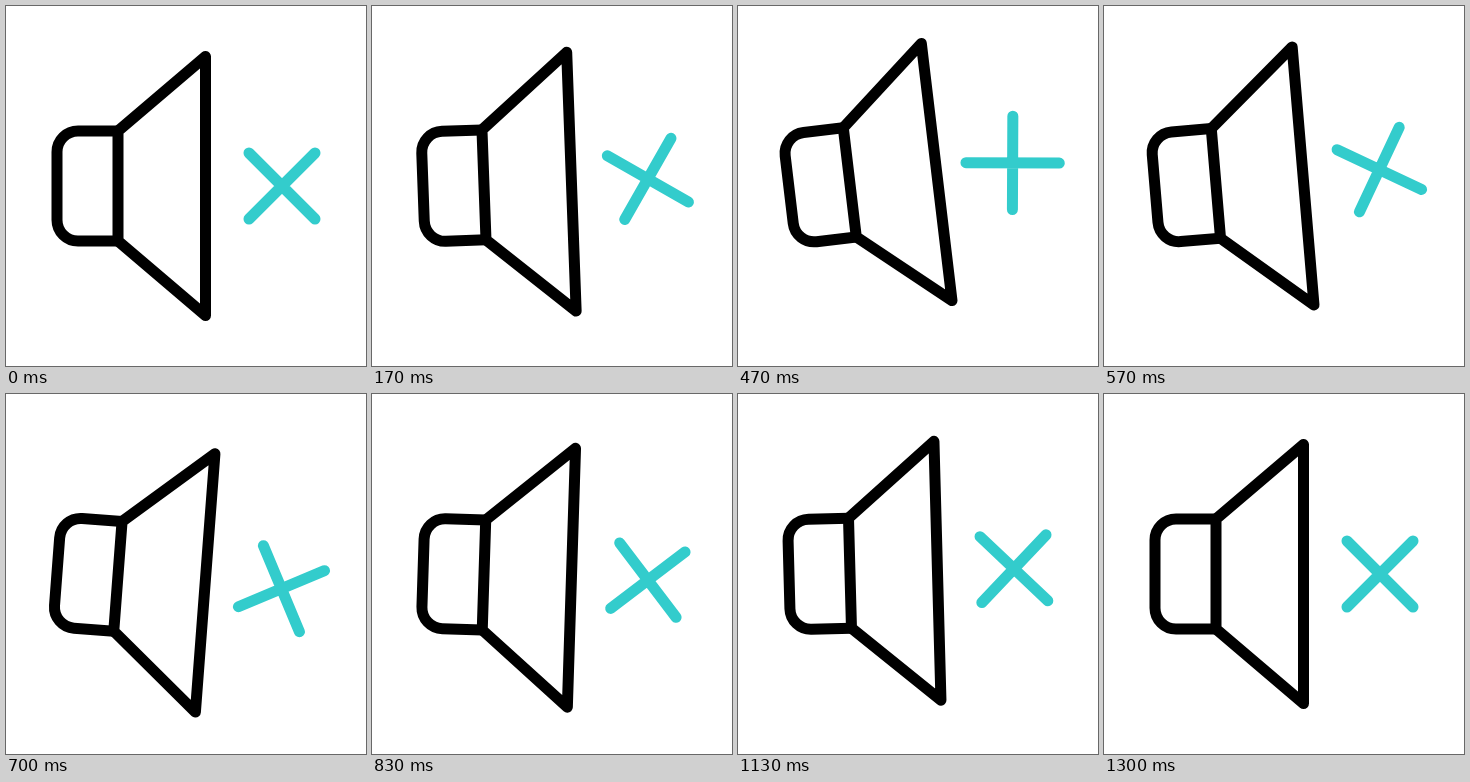
Write an HTML page that moves like this. It is 360 px wide and 360 px high and loops after 2000 ms.

```html
<!DOCTYPE html>
<html lang="en">
<head>
<meta charset="utf-8">
<title>Muted speaker</title>
<style>
  html, body { margin: 0; width: 100%; height: 100%; overflow: hidden; background: #fff; }
  svg { display: block; width: 100vw; height: 100vh; }
  path { fill: none; stroke: #000; stroke-width: 11; stroke-linecap: round; stroke-linejoin: round; }
  #cross { stroke: #3cc; }
</style>
</head>
<body>
<svg viewBox="0 0 360 360">
  <g id="icon">
    <path d="M112 125H72A21 21 0 0 0 51 146V214A21 21 0 0 0 72 235H112"/>
    <path d="M112 125L199.5 50.5V309.5L112 235Z"/>
    <path id="cross" d="M243 147L309 213M309 147L243 213"/>
  </g>
</svg>
<script>
const LOOP = 2000, FPS = 30;
const icon = document.getElementById('icon');
const cross = document.getElementById('cross');

// [step, degrees]
const tilt = [[0, 0], [13, -6.8], [15, -6.8], [22, 4.8], [29, -3.1], [39, 0]];
const spin = [[0, 0], [13, -40], [22, 20], [28, -8], [33, 0]];

const smooth = s => s * s * (3 - 2 * s);

// Same curve as cubic-bezier(.42, 0, .58, 1)
function easeInOut(x) {
  let lo = 0, hi = 1;
  for (let i = 0; i < 20; i++) {
    const s = (lo + hi) / 2, r = 1 - s;
    if (1.26 * r * r * s + 1.74 * r * s * s + s ** 3 < x) lo = s; else hi = s;
  }
  return smooth(lo);
}

function valueAt(keys, step, ease) {
  const i = keys.findIndex(key => key[0] > step);
  if (i < 0) return keys[keys.length - 1][1];
  const [k0, v0] = keys[i - 1], [k1, v1] = keys[i];
  return v0 + (v1 - v0) * ease((step - k0) / (k1 - k0));
}

function draw(now) {
  const step = Math.floor((now % LOOP) * FPS / 1000 + 0.11);
  icon.setAttribute('transform', `rotate(${valueAt(tilt, step, easeInOut)} 81 180)`);
  cross.setAttribute('transform', `rotate(${valueAt(spin, step, smooth)} 276 180)`);
}

const start = performance.now();
function tick() {
  draw(performance.now() - start);
  requestAnimationFrame(tick);
}
tick();
</script>
</body>
</html>
```
